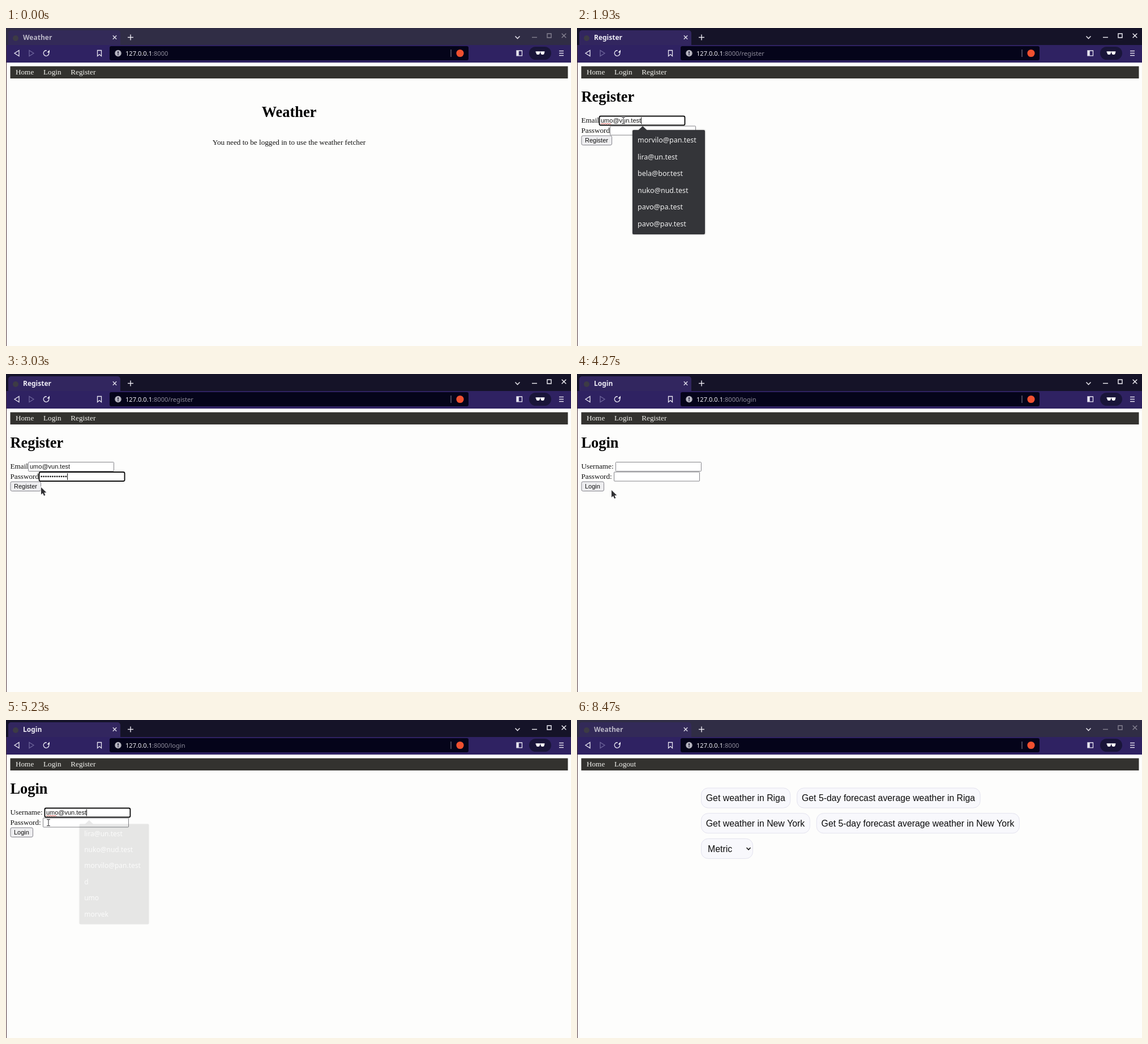
An HTML page with a canvas for the animation above (8540 ms loop, 998 by 561 pixels).

```html
<!DOCTYPE html>
<html lang="en">
<head>
<meta charset="utf-8">
<title>Weather</title>
<style>
html, body { margin: 0; width: 100%; height: 100%; overflow: hidden; background: #fdfdfc; }
canvas { display: block; }
#popup {
  position: absolute; top: 180px; width: 128px; height: 184px; box-sizing: border-box;
  padding: 3px 9px; border-radius: 2px; background: #343539; color: #f0f0f0;
  box-shadow: 0 0 3px rgba(0, 0, 0, .4); transform-origin: 50% 88.5px;
  font: 12.5px/29.6px "Noto Sans", "Open Sans", sans-serif; white-space: pre;
}
#popup::before {
  content: ""; position: absolute; left: 10px; top: -7px; width: 16px; height: 7.5px;
  background: inherit; clip-path: polygon(50% 0, 100% 100%, 0 100%);
}
</style>
</head>
<body>
<canvas id="stage" width="998" height="561"></canvas>
<div id="popup"></div>
<script>
const ctx = document.getElementById('stage').getContext('2d');
const list = document.getElementById('popup');
const LOOP = 8540;
const UI = '"Noto Sans", "Open Sans", sans-serif';
const SERIF = '"Liberation Serif", "Times New Roman", serif';
const SANS = '"Liberation Sans", Arial, sans-serif';
const BODY = '13.2px ' + SERIF, TITLE = 'bold 26.4px ' + SERIF, URL_FONT = '11.1px ' + UI;
const INPUT = '11px ' + SANS, PILL = '15.84px ' + SANS;
const EMAIL = 'umo@vun.test';
const MARGIN = 7.5, FIELD_W = 152, FIELD_H = 17;

// Moments in ms
const FOCUS = 1000, REGISTER = 1160, LOGIN = 3560, INSIDE = 6190, LEAVE = 7630, RETURN = 8330, BLUR = 8470;

const register = {
  title: 'Register', labels: ['Email', 'Password'], open: 1760, close: 2080, press: 3190,
  items: ['morvilo@pan.test', 'lira@un.test', 'bela@bor.test', 'nuko@nud.test', 'pavo@pa.test', 'pavo@pav.test']
};
const login = {
  title: 'Login', labels: ['Username: ', 'Password: '], open: 4890, close: 5142, press: 6100,
  items: ['lira@un.test', 'nuko@nud.test', 'morvilo@pan.test', 'd', 'umo', 'morvek']
};

// Pointer stops: arrival time, x, y
const stops = [
  [30, 56, -14], [480, 235, 275], [980, 136, 78], [1680, 82, 163], [2130, 108, 181],
  [2600, 470, 205], [3030, 62, 200], [3180, 44, 199], [3700, 61, 205], [4700, 146, 165],
  [5210, 75, 181], [5730, 56, 248], [5870, 32, 199], [6670, 549, 409], [7030, 814, 463],
  [LEAVE, 886, 423]
];

const ramp = (t, a, b) => Math.max(0, Math.min(1, (t - a) / (b - a)));
const within = (t, a, b) => t >= a && t < b;

function text(s, x, y, font, color, align = 'left') {
  ctx.font = font;
  ctx.fillStyle = color;
  ctx.textAlign = align;
  ctx.fillText(s, x, y);
  return ctx.measureText(s).width;
}

function width(s, font) {
  ctx.font = font;
  return ctx.measureText(s).width;
}

function rect(x, y, w, h, color) {
  ctx.fillStyle = color;
  ctx.fillRect(x, y, w, h);
}

function paint(fill, stroke, line) {
  if (fill) { ctx.fillStyle = fill; ctx.fill(); }
  if (stroke) { ctx.strokeStyle = stroke; ctx.lineWidth = line; ctx.stroke(); }
}

function box(x, y, w, h, r, fill, stroke, line = 1) {
  ctx.beginPath();
  ctx.roundRect(x, y, w, h, r);
  paint(fill, stroke, line);
}

function poly(points, fill, stroke, line, close) {
  ctx.beginPath();
  points.forEach(([x, y]) => ctx.lineTo(x, y));
  if (close) ctx.closePath();
  paint(fill, stroke, line);
}

function disc(x, y, r, color) {
  ctx.beginPath();
  ctx.arc(x, y, r, 0, Math.PI * 2);
  paint(color);
}

function strokeAt(x, y, dx, dy, color, line = 1.4) {
  poly([[x - dx, y - dy], [x + dx, y + dy]], null, color, line);
}

function cross(x, y, r, color) {
  strokeAt(x, y, r, r, color);
  strokeAt(x, y, r, -r, color);
}

function chevron(x, y, r, color) {
  poly([[x - r, y - r / 2], [x, y + r / 2], [x + r, y - r / 2]], null, color, 1.6);
}

function arrow(x, y, dir, color) {
  poly([[x + 4 * dir, y], [x - 4 * dir, y - 5], [x - 4 * dir, y + 5]], null, color, 1.3, true);
}

function tabStrip(title, focused) {
  const winInk = focused ? '#f0eff5' : '#858291';
  rect(0, 0, 998, 30, focused ? '#151328' : '#302d45');
  box(4, 4, 198, 27, [5, 5, 0, 0], focused ? '#32265f' : '#332a58');
  disc(17, 18, 5, '#3d3b45');
  text(title, 30, 20.5, '600 12px ' + UI, focused ? '#efedf6' : '#b9b6c6');
  cross(192, 16.5, 3.2, '#dddbe8');
  strokeAt(220, 16.5, 5, 0, '#eeecf4');
  strokeAt(220, 16.5, 0, 5, '#eeecf4');
  chevron(903.5, 16.5, 4, '#dddbe4');
  strokeAt(933.5, 16.5, 4.5, 0, winInk);
  box(956, 10, 7, 7, 0, null, winInk, 1.4);
  cross(985.5, 13.5, 3.8, winInk);
}

function toolbar(route) {
  const ink = '#e8e6f1', mid = 44.5;
  rect(0, 30, 998, 31, '#2f2262');
  arrow(19, mid, -1, ink);
  arrow(45, mid, 1, '#6e659b');
  ctx.beginPath();
  ctx.arc(71, mid, 4.7, -0.75, 4.9);
  paint(null, ink, 1.5);
  poly([[77, 38.5], [77, 43.3], [72.3, 43.3]], ink);
  poly([[161.5, 39.5], [168.5, 39.5], [168.5, 49.5], [165, 46.5], [161.5, 49.5]], null, ink, 1.3, true);

  box(183, 32, 634, 25, 3, '#05041a');
  disc(198, mid, 5.7, '#b5b4bf');
  rect(197.2, 41.2, 1.6, 4.1, '#11102a');
  rect(197.2, 46.4, 1.6, 1.6, '#11102a');
  const w = text('127.0.0.1', 211, 48.5, URL_FONT, '#f2f1f7');
  text(':8000' + route, 211 + w, 48.5, URL_FONT, '#8e8c9b');
  rect(785.5, 38, 1, 13, '#8b8898');
  disc(802, mid, 6.6, '#ef5030');

  box(902, 40, 9.5, 8.8, 0, null, ink, 1.3);
  rect(902, 40, 3.8, 8.8, ink);
  box(924, 33, 39, 23, 11.5, '#191539');
  rect(935.5, 41.5, 16, 1.6, '#fff');
  for (const x of [936.5, 944.5]) box(x, 41.5, 6.4, 5.5, [0, 0, 3, 3], '#fff');
  for (let i = -1; i < 2; i++) strokeAt(981, mid + i * 4, 4, 0, ink);
}

function navbar(...links) {
  rect(MARGIN, 67.5, 985, 21.5, '#33322f');
  let x = 17;
  for (const s of links) x += text(s, x, 82.3, BODY, '#f3f3ef') + 16.8;
}

function fieldRect(page, i) {
  return [MARGIN + width(page.labels[i], BODY), 155 + i * 17.5];
}

function field(x, y, focused) {
  if (focused) box(x + 0.5, y + 0.5, FIELD_W - 1, FIELD_H - 1, 2.5, '#fff', '#101010', 1.9);
  else box(x + 0.5, y + 0.5, FIELD_W - 1, FIELD_H - 1, 1, '#fff', '#77767c', 0.9);
  return x + 3;
}

function caret(x, y) {
  rect(x, y + 2.5, 1, 12, '#111');
}

function squiggle(x, y) {
  const wave = Array.from({ length: 10 }, (_, i) => [x + i * 2, y + (i % 2 ? 0.8 : -0.6)]);
  poly(wave, null, '#e0443c', 0.9);
}

function emailField(x, y, count, focused) {
  const left = field(x, y, focused);
  const w = text(EMAIL.slice(0, count), left, y + 12.2, INPUT, '#151515');
  if (!focused) return;
  if (count > 2) squiggle(left, y + 13.8);
  caret(left + w, y);
}

function secretField(x, y, count, focused) {
  const left = field(x, y, focused), step = 3.92;
  for (let i = 0; i < count; i++) disc(left + 1.7 + i * step, y + 8.3, 1.4, '#151515');
  if (focused) caret(left + count * step, y);
}

function form(t, p) {
  const { open, close, press } = p;
  const next = close + 100;
  const count = start => Math.floor(ramp(t, start, start + 12 * 28) * 12);
  const typed = Math.floor(ramp(t, open + 40, open + 160) * EMAIL.length);
  navbar('Home', 'Login', 'Register');
  text(p.title, MARGIN, 130.4, TITLE, '#000');
  p.labels.forEach((s, i) => text(s, MARGIN, 167.3 + i * 17.5, BODY, '#111'));
  emailField(...fieldRect(p, 0), typed, within(t, open - 40, next));
  secretField(...fieldRect(p, 1), count(next + 40), within(t, next, press));
  const pressed = within(t, press, press + 90);
  box(8, 190, width(p.title, INPUT) + 12.6, 16.5, 2.5, pressed ? '#dedee2' : '#eeeef0', '#78777f', 0.9);
  text(p.title, 14, 202.3, INPUT, '#111');
}

function popup(t, p) {
  const a = p ? ramp(t, p.open, p.open + 60) * (1 - ramp(t, p.close, p.close + 100)) : 0;
  list.style.opacity = a;
  if (!a) return;
  list.textContent = p.items.join('\n');
  list.style.left = fieldRect(p, 0)[0] + FIELD_W / 2 - 17 + 'px';
  list.style.transform = `scale(${1 - 0.045 * (1 - a)})`;
}

function pill(label, x, y, w = width(label, PILL) + 17.3) {
  box(x + 0.5, y + 0.5, w, 35, 12, '#f8f8fc', '#e3e2ee');
  text(label, x + 8.8, y + 23.3, PILL, '#0c0c0c');
  return w + 12;
}

function welcome() {
  navbar('Home', 'Login', 'Register');
  text('Weather', 500, 156.5, TITLE, '#000', 'center');
  text('You need to be logged in to use the weather fetcher', 500, 206, BODY, '#111', 'center');
}

function dashboard() {
  const left = 219, top = 119.5, row = 44.7;
  navbar('Home', 'Logout');
  ['Riga', 'New York'].forEach((city, i) => {
    const y = top + i * row;
    const x = left + pill('Get weather in ' + city, left, y);
    pill('Get 5-day forecast average weather in ' + city, x, y);
  });
  pill('', left, top + 2 * row, 91);
  text('Metric', 231, 232.5, PILL, '#0c0c0c');
  chevron(303, 227, 3.5, '#111');
}

// Longer moves take longer; the pointer rests between them.
function pointerAt(t) {
  if (within(t, RETURN, BLUR)) return [53, -12];
  if (!within(t, stops[0][0], LEAVE)) return null;
  const i = stops.findIndex(s => s[0] > t);
  const [t0, x0, y0] = stops[i - 1], [t1, x1, y1] = stops[i];
  const time = 50 + 18 * Math.sqrt(Math.hypot(x1 - x0, y1 - y0));
  const u = ramp(t, Math.max(t0, t1 - time), t1), e = u * u * (3 - 2 * u);
  return [x0 + (x1 - x0) * e, y0 + (y1 - y0) * e];
}

function inField(page, x, y) {
  return [0, 1].some(i => {
    const [fx, fy] = fieldRect(page, i);
    return within(x, fx, fx + FIELD_W) && within(y, fy, fy + FIELD_H);
  });
}

function beam(color, line) {
  strokeAt(0, 0, 0, 5, color, line);
  for (const y of [-5.5, 5.5]) strokeAt(0, y, 3, 0, color, line);
}

function pointer(t, page) {
  const at = pointerAt(t);
  if (!at) return;
  ctx.save();
  ctx.translate(...at);
  if (page && inField(page, ...at)) {
    beam('#fff', 2.6);
    beam('#4a4a4e', 1.2);
  } else {
    const shape = [[0, 0], [0, 12.6], [3, 10], [5.1, 14.8], [7.3, 13.8], [5.2, 9.2], [9.2, 9]];
    poly(shape, null, '#f4f4f4', 1.6, true);
    poly(shape, '#303033');
  }
  ctx.restore();
}

function draw(t) {
  const page = within(t, REGISTER, LOGIN) ? register : within(t, LOGIN, INSIDE) ? login : null;
  rect(0, 0, 998, 561, '#fdfdfc');
  tabStrip(page ? page.title : 'Weather', within(t, FOCUS, BLUR));
  toolbar(page ? '/' + page.title.toLowerCase() : '');
  if (page) form(t, page);
  else if (t < REGISTER) welcome();
  else dashboard();
  rect(0, 30, 1, 531, '#4b3239');
  popup(t, page);
  pointer(t, page);
}

const start = performance.now();
function tick() {
  draw((performance.now() - start) % LOOP);
  requestAnimationFrame(tick);
}
tick();
</script>
</body>
</html>
```
